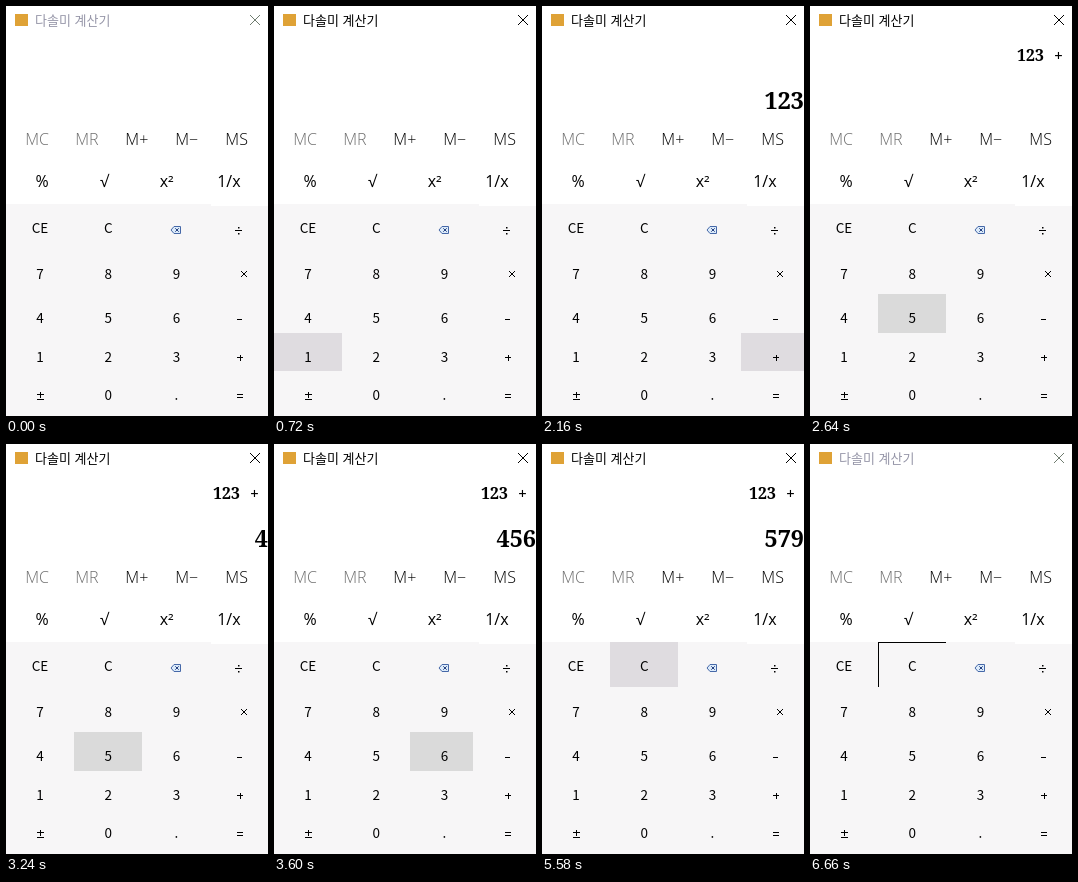
Write an HTML page that moves like this. It is 262 px wide and 410 px high and loops after 6.78 s.

```html
<!DOCTYPE html>
<html lang="ko">
<head>
<meta charset="utf-8">
<title>다솔미 계산기</title>
<style>
  html, body { margin: 0; width: 100%; height: 100%; overflow: hidden; background: #fff; }
  svg { display: block; font-family: "Noto Sans CJK KR", "Noto Sans CJK", sans-serif; }
  .memory { font-size: 16px; font-family: "Open Sans", sans-serif; font-weight: 300; }
  .func { font-size: 16px; font-family: "Open Sans", sans-serif; }
  .key { font-size: 13.5px; }
  .bold { font-family: "Noto Serif", serif; font-weight: bold; }
  .line { fill: none; stroke: #000; shape-rendering: crispEdges; }
</style>
</head>
<body>
<svg id="stage" width="262" height="410" viewBox="0 0 262 410">
  <rect x="9" y="8" width="13" height="12" fill="#dfa236"/>
  <text id="title" x="29" y="18.5" font-size="13">다솔미 계산기</text>
  <path id="close" class="line" d="M244 9l10 10m0-10l-10 10"/>
  <path d="M0 198H205V200H262V410H0z" fill="#f7f6f7"/>
  <rect id="hover"/>
  <path id="focus" class="line" d="M68.5 243V198.5H136"/>
  <g id="labels" text-anchor="middle"></g>
  <path class="line" d="M229 224.5h7M235 265l6 6m0-6l-6 6M231 313.5h5M231 351.5h6m-3-3v6M231 388.5h6m-6 3h6"/>
  <path class="line" d="M31 388.5h7m-3.5-3v6M31 393.5h7"/>
  <path d="M232 221h1.5v1.5H232zM232 227h1.5v1.5H232z"/>
  <path d="M165 224l3-3.5h6.5v7h-6.5z" fill="#dcebfa" stroke="#4668a8"/>
  <path d="M169.3 222.3l3.4 3.4m0-3.4l-3.4 3.4" stroke="#243f80"/>
  <g class="bold">
    <text id="sum" font-size="16"><tspan x="207" y="55">123</tspan><tspan x="244" y="55">+</tspan></text>
    <text id="value" x="262" y="102.5" font-size="23.5" text-anchor="end"></text>
  </g>
</svg>
<script>
const LOOP = 6780;
const $ = id => document.getElementById(id);
const labels = $("labels");

function label(text, x, y, cls, color = "#000") {
  const el = document.createElementNS("http://www.w3.org/2000/svg", "text");
  el.textContent = text;
  el.setAttribute("x", x);
  el.setAttribute("y", y);
  el.setAttribute("class", cls);
  el.setAttribute("fill", color);
  labels.append(el);
}

["MC", "MR", "M+", "M−", "MS"].forEach((s, i) =>
  label(s, 31 + i * 49.9, 139, "memory", i < 2 ? "#6d6d6d" : "#000"));

const cells = {};
["%", "√", "x²", "1/x"].forEach((s, i) => {
  label(s, 36 + i * 62.3, 181, "func");
  cells[s] = [5 + i * 62, 157, 62, 41];
});

// Key grid: "" marks the backspace icon; operators and ± are drawn as paths.
const cols = [0, 68, 136, 199, 262], rows = [198, 243, 288, 327, 365, 410];
const keys = [["CE", "C", "", "÷"], ["7", "8", "9", "×"], ["4", "5", "6", "-"],
  ["1", "2", "3", "+"], ["±", "0", ".", "="]];
const base = [227, 272.5, 317, 356, 394];
keys.forEach((row, r) => row.forEach((s, c) => {
  cells[s] = [cols[c], rows[r], cols[c + 1] - cols[c], rows[r + 1] - rows[r]];
  if (c < 3 && s !== "±") label(s, [34, 102.3, 170.5][c], base[r], "key");
}));

// [time, key under the pointer]
const moves = [[0, null], [180, "√"], [240, "C"], [300, "7"], [360, "4"], [480, "1"],
  [1020, "2"], [1440, "3"], [1680, "6"], [1740, "+"],
  [2460, "3"], [2520, "6"], [2640, "5"], [2700, "4"], [3240, "5"], [3540, "6"],
  [3900, "-"], [3960, "="], [5040, "6"], [5100, "9"], [5160, ""], [5220, "√"],
  [5340, "C"], [6240, null]];
// [press, release, value shown after release]
const clicks = [[720, 840, "1"], [1140, 1200, "12"], [1500, 1620, "123"], [2160, 2220, ""],
  [2880, 3000, "4"], [3300, 3360, "45"], [3540, 3600, "456"], [4320, 4380, "579"],
  [5580, 5700, ""]];

const show = (id, on) => $(id).setAttribute("visibility", on ? "visible" : "hidden");

function draw(t) {
  const active = t >= 720 && t < 6660;
  $("title").setAttribute("fill", active ? "#000" : "#9696a8");
  $("close").style.stroke = active ? "#000" : "#6f7c6f";

  const key = moves.findLast(m => m[0] <= t)[1];
  const down = clicks.some(([a, b]) => t >= a && t < b);
  show("hover", key !== null);
  if (key !== null) {
    ["x", "y", "width", "height"].forEach((a, i) => $("hover").setAttribute(a, cells[key][i]));
    $("hover").setAttribute("fill", down ? "#dfdce0" : "#dadada");
  }

  const last = clicks.findLast(c => c[1] <= t);
  $("value").textContent = last ? last[2] : "";
  show("sum", t >= 2220 && t < 5700);
  show("focus", t >= 6660);
}

const start = performance.now();
function tick() {
  draw((performance.now() - start) % LOOP);
  requestAnimationFrame(tick);
}
tick();
</script>
</body>
</html>
```
